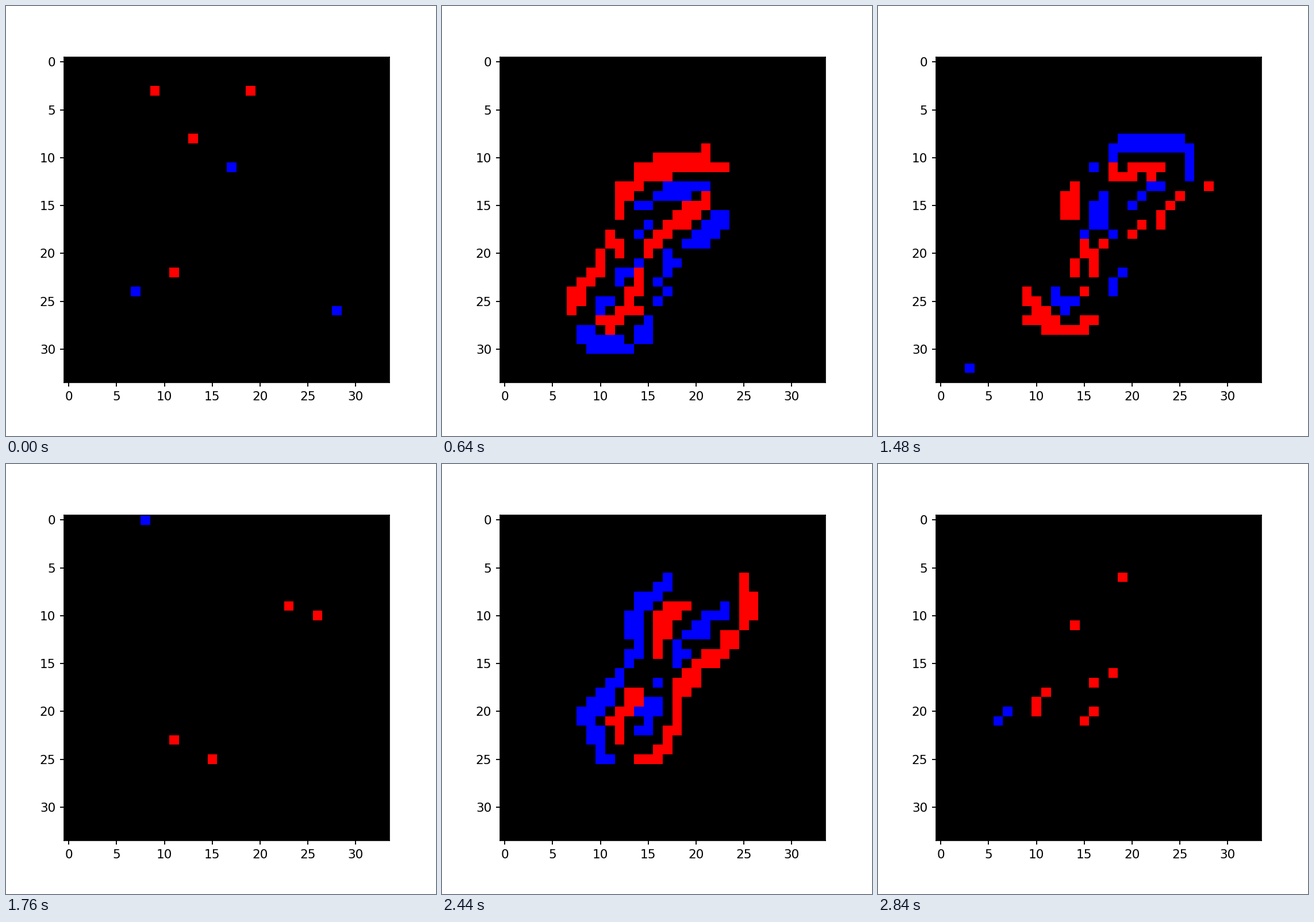
A matplotlib script that plays this animation: 748 px wide and 748 px high, repeating every 2880 ms.

```python
import numpy as np
import matplotlib.pyplot as plt
from matplotlib.animation import FuncAnimation

STAGE, FRAMES, STEP = 748, 72, 40
N = 34
LEFT, TOP, SIDE = 100.75, 89.0, 566.0
RED, BLUE = (255, 0, 0), (0, 0, 255)

# Slanted figure eight in sensor cells: an outer ring pinched by a short bar
RING = np.array([
    (15.0, 10.8), (17.0, 8.3), (20.0, 7.4), (23.8, 7.6), (24.0, 10.0),
    (22.2, 12.0), (19.5, 14.3), (17.4, 17.0), (16.4, 20.5), (15.0, 23.2),
    (12.2, 23.7), (10.3, 21.8), (11.2, 19.2), (13.5, 16.4), (14.8, 13.6)])
BAR = np.linspace((14.8, 15.8), (18.2, 15.8), 8)
PEN, SOFT = 1.4, 0.33

# The digit runs around a triangle in three quick moves
CORNERS = np.array([(-2.9, 0.0), (-1.5, 5.8), (1.9, 0.0), (-2.9, 0.0)])
MOVES = [(12.0, 3.0), (36.7, 1.8), (62.2, 3.2)]  # (middle frame, spread)

SLOWEST, FASTEST = 0.055, 0.33
GAIN, CONTRAST, JITTER, STRAYS = 11.0, 0.7, 0.5, 2.0


def smooth_loop(p, n=8):
    """Closed Catmull-Rom curve through the points p."""
    a, b, c, d = (np.roll(p, k, axis=0)[:, None] for k in (1, 0, -1, -2))
    t = (np.arange(n) / n)[None, :, None]
    q = 0.5 * (2 * b + (c - a) * t + (2 * a - 5 * b + 4 * c - d) * t**2
               + (3 * b - a - 3 * c + d) * t**3)
    return q.reshape(-1, 2)


STROKE = np.vstack([smooth_loop(RING), BAR])
CELLS = np.stack(np.meshgrid(range(N), range(N)), axis=-1).astype(float)


def brightness(shift):
    gap = (CELLS - shift)[:, :, None, :] - STROKE
    dist = np.sqrt((gap**2).sum(-1)).min(-1)
    return 1 / (1 + np.exp((dist - PEN) / SOFT))


def motion(i):
    """Offset, heading and speed of the digit."""
    mid, spread = np.array(MOVES).T
    legs = np.diff(CORNERS, axis=0)
    lengths = np.hypot(*legs.T)
    done = 1 / (1 + np.exp((mid - i) / spread))
    speeds = done * (1 - done) / spread * lengths
    k = speeds.argmax()
    speed = np.clip(speeds[k], SLOWEST, FASTEST)
    return CORNERS[0] + done @ legs, legs[k] / lengths[k], speed


def events(i):
    """Blue where a cell gets brighter, red where it gets darker."""
    rng = np.random.default_rng(100 + i)
    pos, heading, speed = motion(i)
    h = 0.3 * heading
    slope = (brightness(pos + h) - brightness(pos - h)) / 0.6
    noise = np.exp(JITTER * rng.normal(size=(N, N)))
    hit = GAIN * speed * np.abs(slope)**CONTRAST * noise > 1

    img = np.zeros((N, N, 3), np.uint8)
    img[hit & (slope > 0)] = BLUE
    img[hit & (slope < 0)] = RED
    for _ in range(rng.poisson(STRAYS)):
        row, col = rng.integers(N, size=2)
        img[row, col] = RED if rng.random() < 0.75 else BLUE
    return img


plt.rcParams.update({"font.size": 10.4, "xtick.major.width": 0.9,
                     "ytick.major.width": 0.9})
fig = plt.figure(figsize=(5, 5), dpi=STAGE / 5, facecolor="white")
ax = fig.add_axes([LEFT / STAGE, 1 - (TOP + SIDE) / STAGE,
                   SIDE / STAGE, SIDE / STAGE])
picture = ax.imshow(events(0), interpolation="nearest")
ax.set_xticks(range(0, N, 5))
ax.set_yticks(range(0, N, 5))


def draw(i):
    picture.set_data(events(i))
    return [picture]


anim = FuncAnimation(fig, draw, frames=FRAMES, interval=STEP,
                     repeat=True, repeat_delay=0, blit=False)
plt.show()
```
